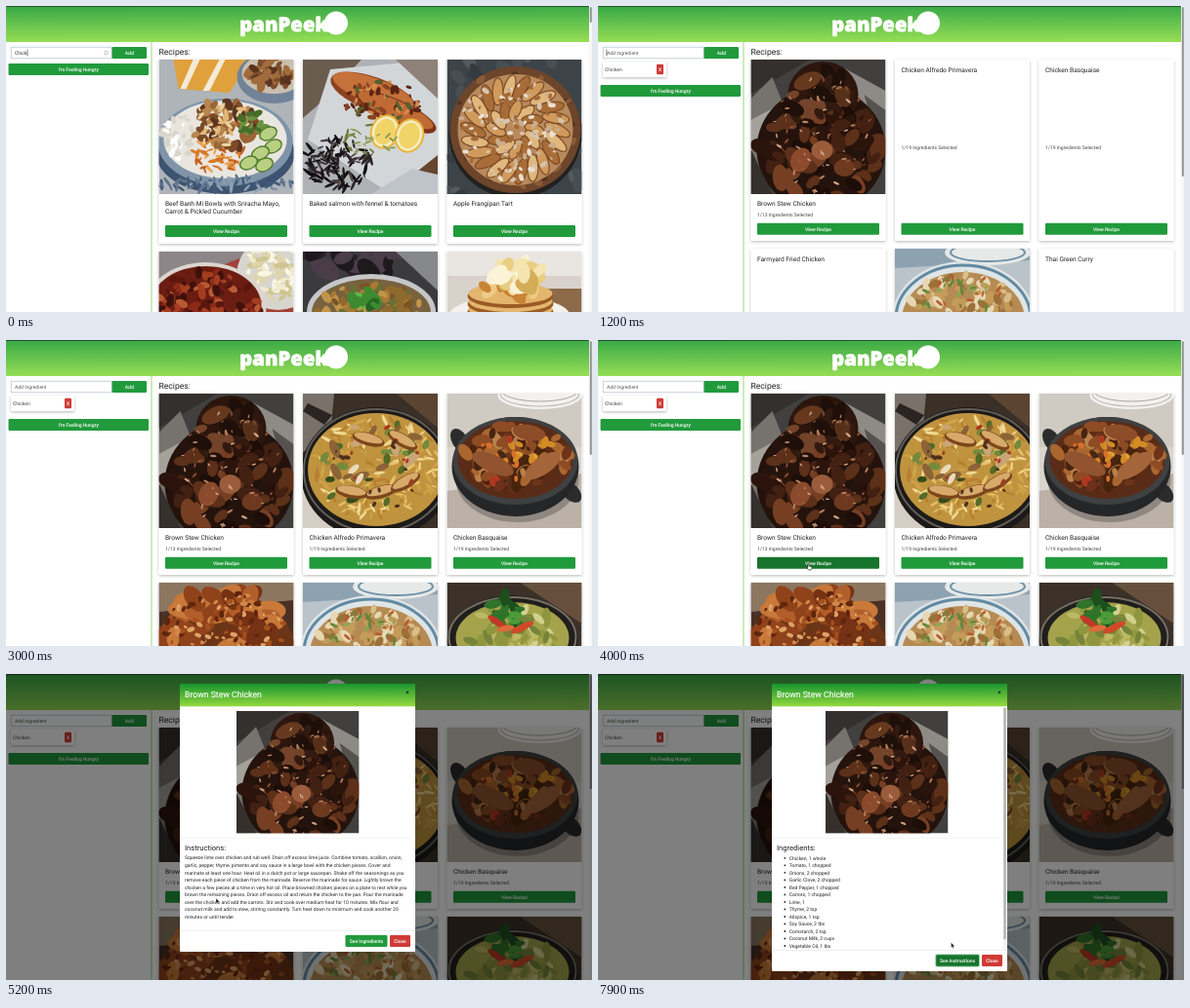
These frames come from a looping animation (600 by 314 pixels, 8000 ms). An HTML page:

```html
<!DOCTYPE html>
<html lang="en">
<head>
<meta charset="utf-8">
<title>Recipe finder</title>
<style>
html, body { margin: 0; width: 100%; height: 100%; overflow: hidden; background: #fff; }
svg { display: block; width: 100vw; height: 100vh; }
text { font-family: Roboto, "Liberation Sans", sans-serif; text-rendering: geometricPrecision; }
</style>
</head>
<body>
<svg id="stage" viewBox="0 0 600 314"></svg>
<script>
const LOOP = 8000, STEP = 100;
const GREEN = '#219a3c', DARK_GREEN = '#17742c', RED = '#cf3a36';
const ADDED = 700, RESULTS = 900, CLICK = 4700, SWAP = 6800;

let seed = 1;
const rand = () => (seed = (seed * 16807) % 2147483647) / 2147483647;
const n1 = v => Math.round(v * 10) / 10;

// SVG helpers
const rect = (x, y, w, h, fill, extra = '') =>
  `<rect x="${x}" y="${y}" width="${w}" height="${h}" fill="${fill}" ${extra}/>`;
const oval = (x, y, rx, ry, fill, turn = 0, extra = '') =>
  `<ellipse cx="${n1(x)}" cy="${n1(y)}" rx="${n1(rx)}" ry="${n1(ry)}" fill="${fill}" transform="rotate(${n1(turn)} ${n1(x)} ${n1(y)})" ${extra}/>`;
const ring = (x, y, rx, ry, stroke, w) => oval(x, y, rx, ry, 'none', 0, `stroke="${stroke}" stroke-width="${w}"`);
const path = (d, fill, extra = '') => `<path d="${d}" fill="${fill}" ${extra}/>`;
const text = (x, y, size, str, fill = '#222', extra = '') =>
  `<text x="${x}" y="${y}" font-size="${size}" fill="${fill}" ${extra}>${str}</text>`;
const button = (x, y, w, h, label, fill = GREEN, id = '') =>
  rect(x, y, w, h, fill, `rx="1.2" ${id && `id="${id}"`}`) +
  text(x + w / 2, y + h / 2 + 1.8, 5, label, '#fff', 'text-anchor="middle" stroke="#fff" stroke-width=".12"');
const group = (id, body, extra = '') => `<g id="${id}" ${extra}>${body}</g>`;

// Scatters small ovals over an elliptical area
function bits(count, x, y, rx, ry, size, colours, flat = .6) {
  let out = '';
  for (let i = 0; i < count; i++) {
    const a = rand() * 2 * Math.PI, r = Math.sqrt(rand()), s = size * (.5 + rand() * .7);
    out += oval(x + rx * r * Math.cos(a), y + ry * r * Math.sin(a), s, s * flat,
      colours[Math.floor(rand() * colours.length)], rand() * 180);
  }
  return out;
}

const base = fill => rect(0, 0, 138, 138, fill);
const cucumber = (x, y) => oval(x, y, 10, 7, '#4f7a2c', -25) + oval(x, y, 8.5, 5.7, '#b9cf82', -25);
const lemon = (x, y) => oval(x, y, 15, 18, '#e8b53a', 20) + oval(x, y, 13, 16, '#f6edc4', 20) + oval(x, y, 10.5, 13.5, '#f0d468', 20);

const dishes = {
  bowls: () => base('#aeb4b8') +
    path('M15 0H95L72 34 20 30Z', '#e0a03c') + path('M35 0H42L28 30H22ZM62 0H68L52 32H45Z', '#f4ead6') +
    oval(118, 18, 38, 27, '#718398') + oval(118, 14, 33, 21, '#c9bfae') + bits(45, 115, 14, 25, 15, 6, ['#5a3420', '#7d4c2a', '#a06c3c']) +
    oval(68, 96, 71, 42, '#3d536f') + oval(68, 85, 69, 45, '#7f94a9') + oval(68, 82, 63, 40, '#e9e6df') +
    bits(45, 22, 78, 18, 22, 5, ['#fff', '#e9e5dc', '#d9d5cb']) +
    bits(50, 60, 98, 28, 18, 5, ['#d97b28', '#c25f20', '#e8a351'], .3) +
    bits(80, 66, 68, 35, 24, 6, ['#5c3520', '#7b4a27', '#9b6536', '#b88650']) +
    bits(28, 64, 66, 33, 22, 5, ['#ecd2a2', '#e2b878'], .35) +
    bits(18, 97, 66, 16, 14, 5, ['#466d2a', '#6a9240']) +
    cucumber(112, 76) + cucumber(117, 89) + cucumber(104, 96) + cucumber(92, 106) + cucumber(108, 108) +
    bits(60, 69, 128, 74, 7, 5, ['#425a78', '#8ea0b3', '#5e7590'], .3),

  salmon: () => base('#aeb2b5') + path('M0 0H60L14 48 0 60Z', '#6b5c50') +
    path('M28 10 138 0V138H90L5 82Z', '#d3d6d8') + path('M95 0H138V40Z', '#8e8179') +
    oval(72, 35, 46, 17, '#8d421f', 20) + oval(72, 32, 44, 13, '#c5713a', 20) +
    oval(95, 54, 45, 13, '#7c3519', 24) + oval(95, 52, 42, 10, '#c06a35', 24) +
    bits(60, 82, 42, 42, 20, 4, ['#5b2412', '#d88a4c', '#8a441f', '#55612e'], .5) +
    bits(110, 34, 106, 36, 27, 6, ['#19161a', '#2d2527', '#4b4040', '#0e0c0f'], .25) +
    path('M138 98 88 138H138Z', '#66462f') + path('M70 138 112 112 138 118V138Z', '#bfc4ca') +
    lemon(84, 74) + lemon(109, 78) + bits(30, 70, 82, 28, 15, 4, ['#6f7b3a', '#8e9c55'], .25),

  tart: () => {
    let slices = '';
    for (let i = 0; i < 34; i++) {
      const outer = i < 22, a = outer ? i * 2 * Math.PI / 22 : i * 2 * Math.PI / 12, r = outer ? 43 : 20;
      slices += oval(70 + r * Math.cos(a), 72 + r * Math.sin(a), outer ? 14 : 11, 5.5,
        ['#cf9a5c', '#e0b77d', '#a96d38'][i % 3], a * 57.3 + 25, 'stroke="#7d4b26" stroke-width="1.2"');
    }
    return base('#3d4449') + bits(70, 69, 69, 95, 95, 9, ['#474f54', '#353b40', '#525a5e']) +
      oval(70, 76, 68, 66, '#22211f') + oval(70, 72, 67, 65, '#6c452b') +
      bits(90, 70, 72, 64, 62, 5, ['#8a5b36', '#54331f']) + oval(70, 72, 59, 57, '#b98a5c') + slices +
      bits(120, 66, 72, 53, 52, 3.5, ['#eadfd2', '#d8c4ad', '#c9ad8d', '#a26a3a']);
  },

  chili: () => base('#a34238') + path('M0 0H100L0 40Z', '#8d8587') + oval(122, 22, 42, 38, '#d7d5ce') +
    bits(90, 122, 20, 34, 28, 7, ['#efe9ce', '#ddd5ae', '#faf6e4', '#cfc594'], .4) +
    oval(48, 57, 62, 46, '#dcd5cf') + oval(48, 56, 57, 41, '#6b1d12') +
    bits(130, 48, 56, 53, 37, 6, ['#8b2a17', '#5a170e', '#a43d20', '#40110c', '#b95a34']),

  masala: () => base('#3b3a3d') + bits(18, 55, 7, 70, 14, 15, ['#2a2029', '#4a3d49', '#1d191c']) +
    path('M95 0H138V40Z', '#86888a') + oval(70, 62, 66, 39, '#c5c6c7') + oval(70, 63, 61, 35, '#77613f') +
    bits(140, 70, 64, 56, 31, 6, ['#a67a32', '#c2944a', '#7b5422', '#8f6a2d', '#687133']) +
    bits(18, 65, 50, 14, 10, 8, ['#3d8a30', '#62b648', '#276523']),

  pancakes: () => base('#d8d2cb') + rect(0, 0, 138, 25, '#e9e5e0') + path('M92 38H138V62H92Z', '#8c6a4a') +
    oval(64, 66, 62, 20, '#f3f1ed') + [62, 54, 46].map(y => oval(65, y, 44, 12, '#9a5b24') + oval(65, y - 3, 43, 11, '#e3b56d')).join('') +
    bits(16, 66, 38, 30, 7, 9, ['#c98334', '#efca86']) +
    bits(19, 72, 24, 28, 15, 12, ['#f4e4b0', '#e8cd83', '#fbf3d6', '#d4ad58']),

  stew: () => base('#41403e') + path('M0 0H60L0 35Z', '#33302d') + path('M0 40 22 18 34 48 12 138H0Z', '#76736f') +
    path('M0 62 30 46 36 65 0 94Z', '#a5a29c') + path('M94 8 138 32V86L112 46Z', '#8e8b86') + path('M116 36 138 52V110Z', '#55524f') +
    oval(72, 92, 66, 64, '#24130d') + oval(74, 36, 36, 34, '#2c160e') +
    bits(75, 73, 96, 62, 46, 12, ['#2a140c', '#422012', '#5c3019', '#763f23', '#1c0d08']) +
    bits(45, 70, 36, 31, 32, 10, ['#321a10', '#573019', '#73442a', '#1e0f09']) +
    oval(73, 93, 11, 10, '#9a5c3b') + oval(51, 103, 10, 13, '#8b4a2c', 25) + oval(96, 111, 11, 9, '#6d3a20') + oval(58, 22, 15, 8, '#66391f', -25) +
    bits(60, 73, 78, 52, 62, 2.8, ['#b98260', '#925637', '#d3a789'], .35) + path('M0 92 22 138H0Z', '#35302c'),

  pasta: () => base('#3b3027') + path('M0 0H32L28 42 0 60Z', '#79716a') + path('M5 10 30 22 22 32 0 18Z', '#2a2523') +
    path('M0 70 36 138H0Z', '#d4cec4') + path('M96 0H138V35Z', '#5b4532') +
    oval(75, 82, 77, 68, '#1b1a19') + ring(75, 79, 74, 63, '#625d56', 2) + oval(75, 78, 70, 58, '#c0933f') +
    bits(180, 75, 76, 66, 53, 6, ['#e4c36c', '#d0a349', '#f0d890', '#b6802f'], .25) +
    bits(24, 76, 76, 60, 47, 6, ['#536a28', '#758a3b', '#354c1c']) +
    bits(14, 72, 60, 55, 36, 9, ['#eadabc', '#8c6237', '#cba574'], .45) +
    [[50, 101, 10], [80, 101, -15], [105, 91, -30], [67, 47, 15], [102, 48, 30]].map(([x, y, a]) =>
      oval(x, y, 17, 6.5, '#7d461d', a) + oval(x, y - 1.5, 15, 4.5, '#d7aa6b', a)).join('') +
    bits(22, 75, 75, 58, 46, 3, ['#a63a22', '#50311b']),

  basque: () => base('#d9d4cc') + rect(0, 0, 138, 55, '#cfcac2') + path('M0 100 138 82V138H0Z', '#bbb1a6') +
    oval(95, 2, 43, 14, '#f2f1ee') + ring(95, 1, 40, 12, '#bdb9b4', 1.2) + ring(95, -4, 40, 12, '#aaa6a1', 1) +
    oval(72, 88, 63, 44, '#8f8780') + oval(13, 48, 13, 8, '#2b2b2c', 60) + oval(127, 101, 13, 8, '#2b2b2c', 45) +
    oval(70, 75, 65, 51, '#252628') + oval(70, 69, 64, 45, '#3f4041') + oval(70, 68, 59, 40, '#5a2c18') +
    bits(90, 71, 65, 53, 33, 9, ['#8e4b24', '#6d3219', '#a9672f', '#48240f', '#b9804b']) +
    bits(10, 76, 59, 36, 20, 6, ['#e0a42f', '#d28b25']) + bits(18, 68, 69, 44, 26, 4, ['#b23822', '#3e2a19', '#d9712c']) +
    oval(47, 72, 23, 9, '#925430', 25) + oval(98, 74, 21, 9, '#a5653a', -35) + oval(84, 40, 17, 8, '#8d4d28', 10),

  fried: () => base('#493125') + path('M0 0H138V18L0 30Z', '#8c765f') + oval(68, 72, 72, 62, '#6b3517') +
    bits(42, 68, 46, 60, 37, 16, ['#90431b', '#b25f2b', '#753214', '#c87838']) +
    bits(120, 68, 46, 62, 38, 3.5, ['#d1884a', '#5e260e', '#a4501f', '#e0a467']),

  soup: () => base('#b9c3c9') + path('M0 0H138V12L0 20Z', '#8da2b1') + oval(95, 4, 44, 13, '#e6e9e8') + ring(95, 4, 38, 9, '#6f90a8', 2) +
    oval(70, 72, 73, 59, '#dfe5e6') + ring(70, 72, 69, 55, '#628aa3', 3) + oval(70, 73, 63, 49, '#b68b53') +
    bits(110, 69, 58, 53, 33, 6, ['#d8bd89', '#c49b5a', '#e7d7b2', '#9c7039']) +
    bits(45, 69, 50, 44, 23, 4, ['#67863c', '#88a854', '#b75c2b'], .35),

  curry: () => base('#3b3129') + path('M75 0H138V42Z', '#66503d') + oval(67, 59, 67, 46, '#211f1d') + ring(67, 56, 65, 41, '#777065', 2) +
    oval(67, 57, 58, 37, '#a4a34c') + bits(60, 67, 57, 52, 30, 9, ['#bcb965', '#8f963d', '#d3cf8d', '#75843a'], .45) +
    bits(22, 61, 31, 17, 17, 8, ['#2e7329', '#4d9a3a', '#1d501e'], .5) +
    oval(52, 41, 12, 3.5, '#c33823', 35) + oval(77, 46, 13, 3.5, '#cf4a28', -25) + oval(60, 47, 9, 3, '#e06a3b', -10),
};

const symbols = Object.entries(dishes).map(([name, draw], i) => {
  seed = 911 + i * 7919;
  return `<symbol id="${name}" viewBox="0 0 138 138"><g filter="url(#soft)">${draw()}</g></symbol>`;
}).join('');
const photo = (name, x, y, size) => `<use href="#${name}" x="${x}" y="${y}" width="${size}" height="${size}"/>`;

const COLUMNS = [156.5, 304, 451.5];
const starters = [
  ['bowls', 'Beef Banh Mi Bowls with Sriracha Mayo,', 'Carrot &amp; Pickled Cucumber'],
  ['salmon', 'Baked salmon with fennel &amp; tomatoes'],
  ['tart', 'Apple Frangipan Tart'], ['chili', ''], ['masala', ''], ['pancakes', ''],
];
const results = [
  ['stew', 'Brown Stew Chicken', 13, RESULTS], ['pasta', 'Chicken Alfredo Primavera', 19, 1400],
  ['basque', 'Chicken Basquaise', 19, 1500], ['fried', 'Farmyard Fried Chicken', 12, 1600],
  ['soup', 'Chicken Congee', 14, RESULTS], ['curry', 'Thai Green Curry', 15, 1700],
];
const cardBox = (x, y, h) => rect(x, y, 138, h, '#fff', 'rx="1" filter="url(#shadow)"');

const starterCards = starters.map(([dish, title, more = ''], i) => {
  const x = COLUMNS[i % 3], y = i < 3 ? 55 : 252;
  return cardBox(x, y, 189) + photo(dish, x, y, 138) + text(x + 6.5, y + 149.6, 6.6, title) +
    text(x + 6.5, y + 157.6, 6.6, more) + button(x + 6.5, y + 170, 125, 12, 'View Recipe');
}).join('');

const resultCards = results.map(([dish, title, total], i) => {
  const x = COLUMNS[i % 3], y = i < 3 ? 55 : 249;
  const words = (titleY, countY) => text(x + 6.5, y + titleY, 6.6, title) +
    text(x + 6.5, y + countY, 5, `1/${total} Ingredients Selected`, '#444');
  return cardBox(x, y, 186) + group('loaded' + i, photo(dish, x, y, 138) + words(149.8, 160.5)) +
    group('empty' + i, words(12.5, 91.8)) +
    button(x + 6.5, y + 167.8, 125, 12, 'View Recipe', GREEN, 'view' + i);
}).join('');

const sidebar = rect(148.4, 37, 1.2, 277, '#a9e08f') +
  rect(5.2, 42.2, 103, 11.6, '#fff', 'stroke="#b3bdcb" stroke-width=".7"') +
  text(9, 50, 5, '', '#333', 'id="field"') + rect(9, 44.8, .6, 6.6, '#222', 'id="caret"') +
  group('clear', oval(102.5, 48, 1.8, 1.8, 'none', 0, 'stroke="#999" stroke-width=".6"')) +
  button(108.5, 42, 35.5, 12, 'Add') +
  group('chip', rect(5, 57, 65, 16, '#fff', 'filter="url(#shadow)"') + text(7, 66.8, 5, 'Chicken', '#444') + button(60, 59.8, 7, 10.4, 'X', RED)) +
  group('hungry', button(2.5, 59, 143.5, 12, "I'm Feeling Hungry"));

const header = rect(0, 0, 597, 37, 'url(#bar)') + rect(0, 0, 600, .8, '#263c2a') +
  text(284.5, 25.5, 20, 'panPeek', '#fff', 'text-anchor="middle" stroke="#fff" stroke-width=".8" stroke-linejoin="round" style="font-family:Open Sans,sans-serif;font-weight:800" letter-spacing=".2"') +
  oval(338, 17.5, 12, 12, '#fff');

const steps = `Squeeze lime over chicken and rub well. Drain off excess lime juice. Combine tomato, scallion, onion,
garlic, pepper, thyme, pimento and soy sauce in a large bowl with the chicken pieces. Cover and
marinate at least one hour. Heat oil in a dutch pot or large saucepan. Shake off the seasonings as you
remove each piece of chicken from the marinade. Reserve the marinade for sauce. Lightly brown the
chicken a few pieces at a time in very hot oil. Place browned chicken pieces on a plate to rest while you
brown the remaining pieces. Drain off excess oil and return the chicken to the pan. Pour the marinade
over the chicken and add the carrots. Stir and cook over medium heat for 10 minutes. Mix flour and
coconut milk and add to stew, stirring constantly. Turn heat down to minimum and cook another 20
minutes or until tender.`.split('\n');
const ingredients = ['Chicken, 1 whole', 'Tomato, 1 chopped', 'Onions, 2 chopped', 'Garlic Clove, 2 chopped',
  'Red Pepper, 1 chopped', 'Carrots, 1 chopped', 'Lime, 1', 'Thyme, 2 tsp', 'Allspice, 1 tsp', 'Soy Sauce, 2 tbs',
  'Cornstarch, 2 tsp', 'Coconut Milk, 2 cups', 'Vegetable Oil, 1 tbs'];

function dialog(bottom, photoX, heading, body, footer) {
  return rect(178, 10, 241, bottom - 10, '#fff', 'rx="1"') + rect(178, 10, 241, 23.3, 'url(#dialogBar)') +
    text(183, 24.3, 8.7, 'Brown Stew Chicken', '#fff', 'stroke="#fff" stroke-width=".15"') +
    text(411, 20.5, 6.5, '×', '#123', 'text-anchor="middle" font-weight="700"') +
    photo('stew', photoX, 38, 125.5) + rect(178, 168, 237, .4, '#e3e3e3') + text(183, 181, 7.6, heading) +
    body + rect(178, bottom - 22, 241, .5, '#dcdcdc') + footer + button(393, bottom - 17, 21, 12, 'Close', RED);
}
const stepsDialog = dialog(285, 236, 'Instructions:',
  steps.map((s, i) => text(183, 190.4 + i * 7.55, 5, s)).join(''), button(347.5, 268, 43, 12, 'See Ingredients'));
const listDialog = dialog(305, 233, 'Ingredients:',
  ingredients.map((s, i) => oval(191.3, 188.8 + i * 7.52, .9, .9, '#222') + text(195.8, 190.5 + i * 7.52, 5, s)).join('') +
  rect(414.6, 33.3, 4.4, 250, '#f5f5f5') + rect(415.3, 34.5, 2.5, 238, '#b5b5b5', 'rx="1.2"'),
  rect(345.2, 287.2, 45.8, 13.6, '#9dd3aa', 'rx="2"') + button(346.2, 288.2, 43.8, 11.6, 'See Instructions', DARK_GREEN));

const gradient = (id, top, bottom) => `<linearGradient id="${id}" x1="0" y1="0" x2=".03" y2="1"><stop stop-color="${top}"/><stop offset="1" stop-color="${bottom}"/></linearGradient>`;
document.getElementById('stage').innerHTML = `<defs>
  <filter id="soft" x="0" y="0" width="1" height="1"><feGaussianBlur stdDeviation=".6"/></filter>
  <filter id="shadow" x="-10%" y="-10%" width="120%" height="125%"><feDropShadow dx="0" dy="1" stdDeviation="1.5" flood-opacity=".28"/></filter>
  ${gradient('bar', '#37a846', '#95dd55')}${gradient('dialogBar', '#16942f', '#93d840')}${symbols}</defs>` +
  rect(0, 0, 600, 314, '#fff') + header + sidebar + text(156.5, 50, 8.6, 'Recipes:') +
  group('starters', starterCards) + group('results', resultCards) +
  rect(597, 0, 3, 314, '#f7f7f7') + rect(597.8, 1, 2, 16, '#909090', 'id="thumb" rx="1"') +
  rect(0, 0, 600, 314, '#000', 'id="shade"') +
  group('modal', group('steps', stepsDialog) + group('list', listDialog)) +
  group('pointer', group('arrow', path('M0 0V5.4L1.3 4.3 2.1 6.2 3 5.8 2.2 4H3.8Z', '#111', 'stroke="#fff" stroke-width=".4"')) +
    group('hand', path('M0 0Q.8-.6 1.2.3V2L3.6 2.6Q4.2 3 3.8 4.4L3 6H.6L-1.2 3.6Q-1-3 0 3.4Z'.replace('-1-3', '-1 3'), '#fff', 'stroke="#111" stroke-width=".6"')));

const el = id => document.getElementById(id);
const show = (id, on) => el(id).setAttribute('display', on ? 'inline' : 'none');
const clamp = v => Math.max(0, Math.min(1, v));
const ease = v => v * v * (3 - 2 * v);
const mix = (a, b, k) => a + (b - a) * k;

function update(t) {
  const added = t >= ADDED, found = t >= RESULTS, open = t >= CLICK, swapped = t >= SWAP;

  const typed = 'Chicken'.slice(0, 5 + Math.floor(t / 100));
  const field = el('field');
  field.textContent = added ? 'Add Ingredient' : typed;
  field.setAttribute('fill', added ? '#555' : '#333');
  el('caret').setAttribute('x', added ? 8.6 : 9 + field.getComputedTextLength() + .3);
  show('caret', !open && (t < 500 || (t % 1000 >= 200 && t % 1000 < 700)));
  show('clear', !added);
  show('chip', added);
  el('hungry').setAttribute('transform', `translate(0 ${added ? 22 : 0})`);

  show('starters', !found);
  show('results', found);
  results.forEach((r, i) => { show('loaded' + i, t >= r[3]); show('empty' + i, t < r[3]); });
  el('thumb').setAttribute('height', !found ? 16 : t < 1400 ? 174 : 117);

  const approach = ease(clamp((t - 3200) / 600)), leave = ease(clamp((t - 5800) / 800));
  const x = mix(mix(125, 215, approach), 361.5, leave), y = mix(mix(110, 230, approach), 275.5, leave);
  const over = !open && y > 223;
  el('pointer').setAttribute('transform', `translate(${x} ${y})`);
  show('pointer', t >= 3200);
  show('hand', over || (t >= 6500 && !swapped));
  show('arrow', !over && (t < 6500 || swapped));
  el('view0').setAttribute('fill', over ? DARK_GREEN : GREEN);

  const fade = clamp((t - CLICK) / 150), drop = 1 - clamp((t - CLICK - 100) / 300);
  el('shade').setAttribute('opacity', fade * .5);
  el('modal').setAttribute('opacity', clamp((t - CLICK - 100) / 150));
  el('modal').setAttribute('transform', `translate(0 ${-16 * drop * drop})`);
  show('modal', open);
  show('steps', !swapped);
  show('list', swapped);
}

const start = performance.now();
function frame() {
  const t = (performance.now() - start) % LOOP;
  update(Math.floor(t / STEP) * STEP);
  requestAnimationFrame(frame);
}
frame();
</script>
</body>
</html>
```
